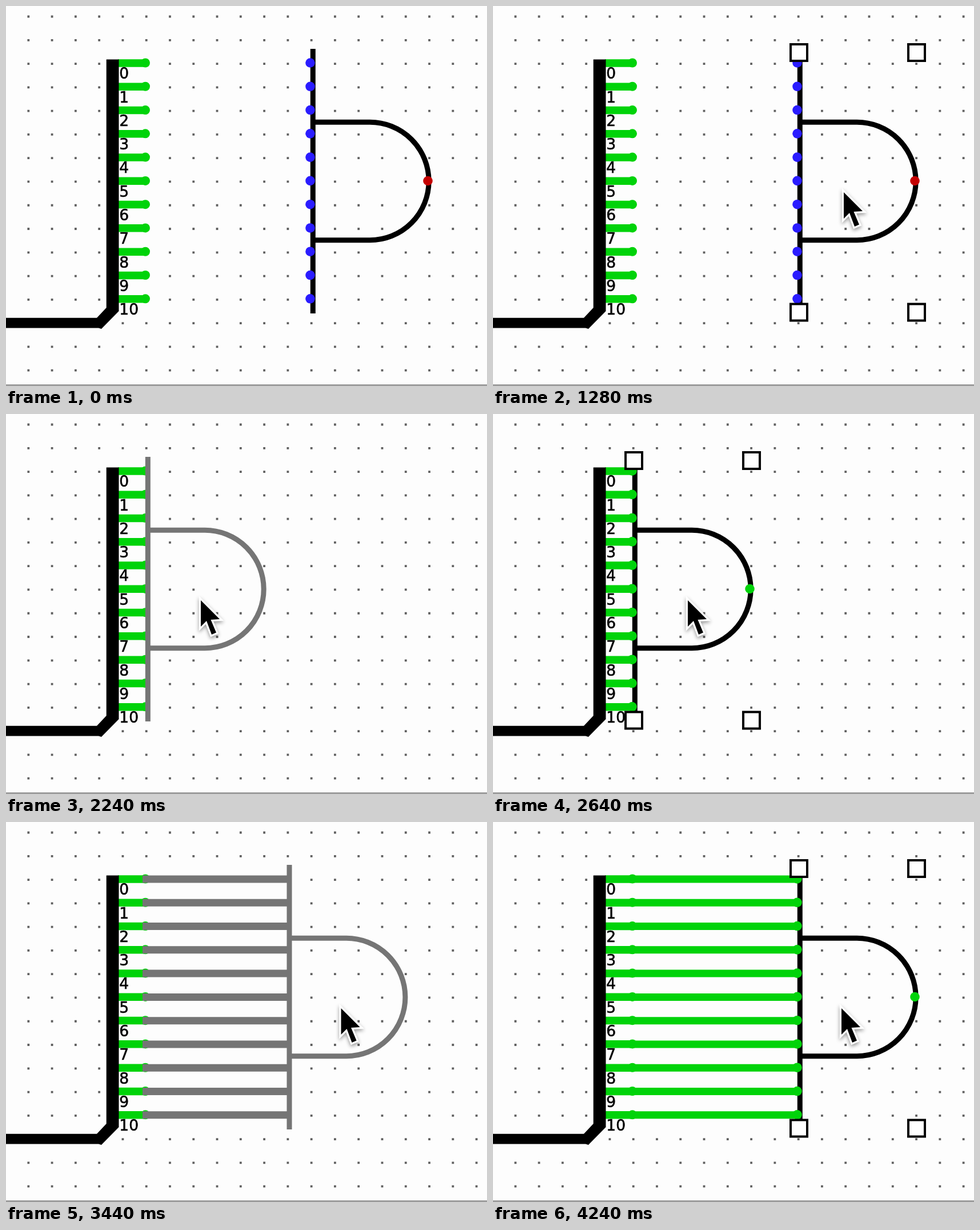
These frames come from a looping animation (842x665 px, 4.8 s). An HTML page:

```html
<!DOCTYPE html>
<html lang="en">
<head>
<meta charset="utf-8">
<title>Splitter and AND gate</title>
<style>
  html, body { margin: 0; width: 100%; height: 100%; overflow: hidden; background: #fdfdfd; }
  svg { display: block; width: 842px; height: 665px; }
  text { font: 26.5px "DejaVu Sans", "Noto Sans", sans-serif; stroke: #000; stroke-width: .6px; }
  #cursor { filter: drop-shadow(0 3px 3px rgba(0, 0, 0, .4)); }
</style>
</head>
<body>
<svg id="stage" viewBox="0 0 842 665">
  <path id="grid" fill="#606060"/>
  <rect y="662.5" width="842" height="2" fill="#777"/>
  <g id="stubs" stroke="#00d30a" fill="#00d30a" stroke-width="13.5"></g>
  <path d="M175.7 93.5H197.5V534L167 565L162 563.5H0V545.7H159L175.7 528Z"/>
  <g id="labels"></g>
  <path id="wires" fill="none" stroke-width="13"/>
  <g id="gate">
    <path id="body" fill="none" stroke-width="9" d="M537.3 75V538M537 203.3H637A103.2 103.2 0 0 1 637 409.7H537"/>
    <g id="ports"></g>
    <circle id="out" cx="738.5" cy="306" r="8.3"/>
    <g id="handles" fill="#fff" stroke="#000" stroke-width="4"></g>
  </g>
  <path id="cursor" d="M0 0V46L10 36L19 60L27 56.5L17.5 34L33 33Z"
        stroke="#fff" stroke-width="6.5" paint-order="stroke"/>
</svg>
<script>
const LOOP = 4800, STEP = 80, PITCH = 41.28, PINS = 11, LAG = 50;
const GREEN = '#00d30a', GRAY = '#757575';
const HOME = 614, NEAR = 341, BACK = 610;   // pointer rests
const ENTER = 320, SELECT = 1120, DRAG = 1600, DROP = 2560, PULL = 2800, DONE = 4000;
const $ = id => document.getElementById(id);

function add(parent, tag, attrs, text) {
  const el = document.createElementNS('http://www.w3.org/2000/svg', tag);
  for (const k in attrs) el.setAttribute(k, attrs[k]);
  if (text !== undefined) el.textContent = text;
  $(parent).append(el);
}

let dots = '';
for (let x = 39.3; x < 842; x += PITCH)
  for (let y = 18.5; y < 650; y += PITCH)
    dots += `M${x - 1.9} ${y - 1.9}h3.8v3.8h-3.8z`;
$('grid').setAttribute('d', dots);

const pinY = i => 99.5 + i * PITCH;
for (let i = 0; i < PINS; i++) {
  const y = pinY(i);
  add('stubs', 'path', { d: `M196 ${y + .4}H247` });
  add('stubs', 'circle', { cx: 244, cy: y, r: 8, stroke: 'none' });
  add('labels', 'text', { x: 198.3, y: y + 27.8 }, i);
  add('ports', 'circle', { cx: 532.5, cy: y, r: 8.3 });
}
for (const x of [535.5, 741.5])
  for (const y of [81.5, 536])
    add('handles', 'rect', { x: x - 14.5, y: y - 14.5, width: 29, height: 29 });

const progress = (t, from, to) => Math.min(1, Math.max(0, (t - from) / (to - from)));
const easeOut = u => u * (2 - u);
const smooth = u => u * u * (3 - 2 * u);

const enter = t => 1 - easeOut(progress(t, ENTER - STEP, SELECT));
const push = t => (NEAR - HOME) * easeOut(progress(t, 1520, 2200));
const pull = t => (BACK - NEAR) * smooth(progress(t, 2720, 3600));

// The gate snaps to whole grid cells, slightly behind the pointer.
const cells = t => Math.round(push(t - LAG) / PITCH) + Math.round(pull(t - LAG) / PITCH);

const show = (id, on) => $(id).setAttribute('visibility', on ? 'visible' : 'hidden');

function draw(ms) {
  const t = Math.floor(ms % LOOP / STEP) * STEP;
  const cell = cells(t), shift = cell * PITCH;
  const stretching = t >= PULL && t < DONE;
  const moving = stretching || (t >= DRAG && t < DROP);
  const joined = t >= DROP && !moving;

  $('gate').setAttribute('transform', `translate(${shift} 0)`);
  $('body').setAttribute('stroke', moving ? GRAY : '#000');
  $('ports').setAttribute('fill', joined ? GREEN : '#2a1cff');
  $('out').setAttribute('fill', joined ? GREEN : '#c40000');
  show('ports', !moving);
  show('out', !moving);
  show('handles', t >= SELECT && !moving);

  let d = '';
  if ((joined || stretching) && cell > -7)
    for (let i = 0; i < PINS; i++) d += `M239 ${pinY(i) + .5}H${535 + shift}`;
  $('wires').setAttribute('d', d);
  $('wires').setAttribute('stroke', joined ? GREEN : GRAY);

  const away = enter(t);
  const x = HOME + 230 * away + push(t) + pull(t), y = 326 + 95 * away;
  show('cursor', t >= ENTER);
  $('cursor').setAttribute('transform', `translate(${x} ${y})`);
}

const start = performance.now();
function frame() {
  draw(performance.now() - start);
  requestAnimationFrame(frame);
}
frame();
</script>
</body>
</html>
```
